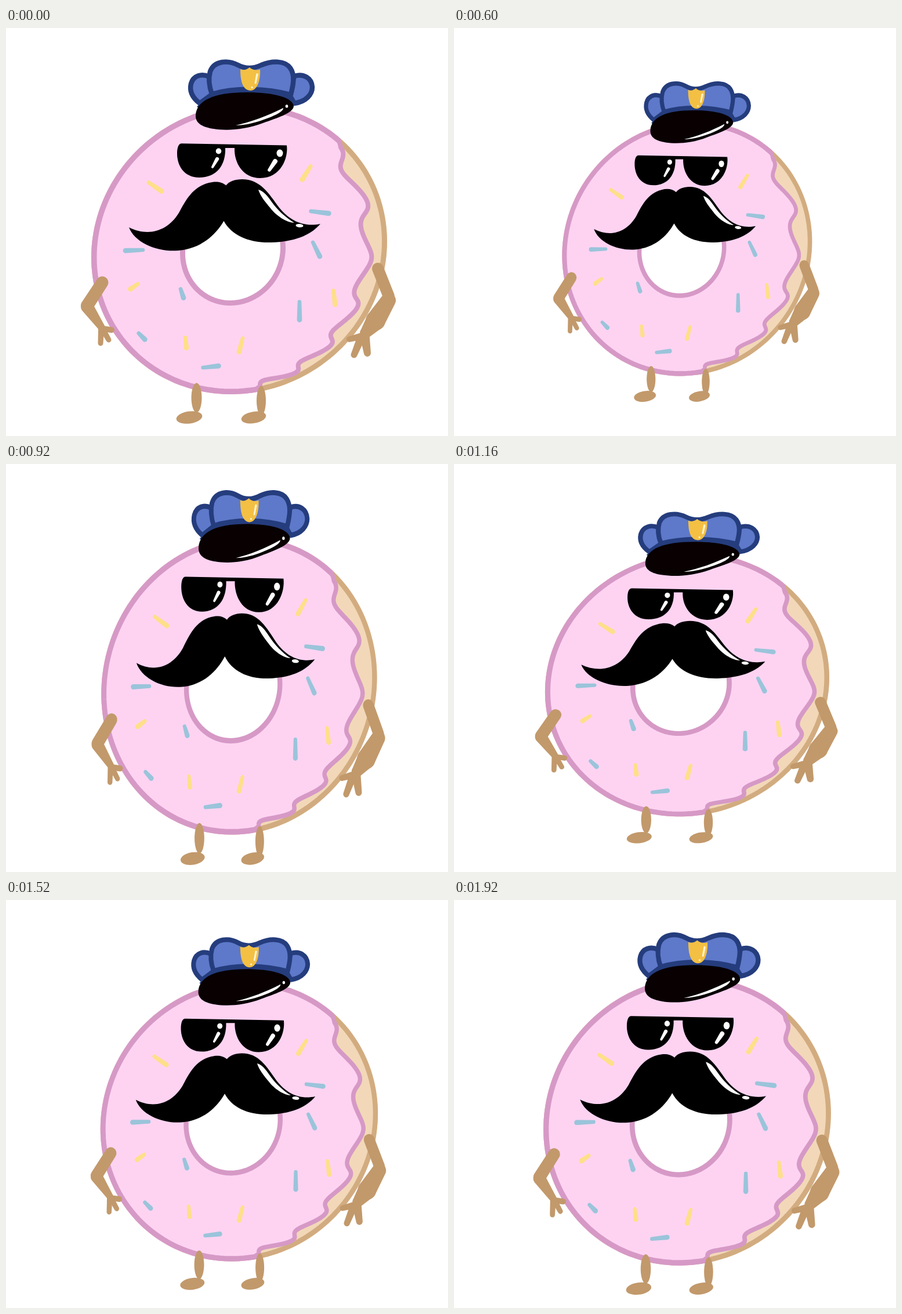
Recreate the animation shown at these times as an HTML page with a canvas. Size 762x704 px, loop 2 s.

```html
<!DOCTYPE html>
<html lang="en">
<head>
<meta charset="utf-8">
<title>Donut officer</title>
<style>
html, body { margin: 0; width: 100%; height: 100%; overflow: hidden; background: #fff; }
canvas { display: block; }
</style>
</head>
<body>
<canvas id="stage" width="762" height="704"></canvas>
<script>
const ctx = document.getElementById('stage').getContext('2d');
const { PI, cos, sin, tanh, atan2, min, floor } = Math;
const LOOP = 2000, STEP = 40, LAST = 1920;
const PIVOT = { x: 401.2, y: 369 };

const C = {
  dough: '#f2d8b8', crust: '#d2ac80', icing: '#fed3f2', rim: '#d699c6',
  limb: '#c2996b', blue: '#5e79c9', navy: '#253d7d', gold: '#f3c044',
  visor: '#080001', yellow: '#fedf89', sky: '#9ac4da', glint: '#fff3d0'
};

// Key poses of the wobble: time, width, height
const POSES = [
  [0, 1, 1], [280, .85, .968], [430, .98, .998], [600, .845, .88],
  [800, 1, .98], [920, .932, 1.029], [1160, .961, .91], [1420, .9, 1],
  [1520, .938, .968], [1720, .89, .93], [1920, .972, .995], [LOOP, 1, 1]
];

function poseAt(t) {
  const i = POSES.findIndex(p => p[0] > t);
  const a = POSES[i - 1], b = POSES[i];
  const ease = (1 - cos(PI * (t - a[0]) / (b[0] - a[0]))) / 2;
  return [1, 2].map(k => a[k] + (b[k] - a[k]) * ease);
}

function fill(shape, color) {
  ctx.fillStyle = color;
  ctx.fill(shape);
}

function line(shape, color, width) {
  ctx.strokeStyle = color;
  ctx.lineWidth = width;
  ctx.stroke(shape);
}

function oval(x, y, rx, ry, turn = 0) {
  const p = new Path2D();
  p.ellipse(x, y, rx, ry, turn, 0, PI * 2);
  return p;
}

// Rounded bar whose ends may differ in radius
function bar(x1, y1, x2, y2, r1, r2) {
  const a = atan2(y2 - y1, x2 - x1), q = PI / 2;
  const p = new Path2D();
  p.arc(x1, y1, r1, a + q, a - q);
  p.arc(x2, y2, r2, a - q, a + q);
  p.closePath();
  return p;
}

// Slightly slanted ellipse
function ring(x, y, rx, ry) {
  const p = new Path2D();
  for (let a = 0; a < 2 * PI; a += PI / 90) p.lineTo(x + rx * cos(a), y + ry * sin(a - .055));
  p.closePath();
  return p;
}

// Icing edge: a ripple around the center whose bumps get closer and flatter
function ripple() {
  const p = new Path2D();
  p.moveTo(548, 160);
  for (let n = 0; n <= 6; n += .04) {
    const dip = (1 - cos(2 * PI * n)) / 2;
    const deg = -45 + 26 * n - .78 * n * n + 5 * tanh(1.6 * (n - 1.9)) * dip;
    const r = 219 + 18 * ((deg - 19) / 64) ** 2 + (11 - 1.1 * n) * (1 - 2 * dip);
    const x = 402 + r * cos(deg * PI / 180), y = 382 + r * sin(deg * PI / 180);
    if (n) p.lineTo(x, y);
    else p.quadraticCurveTo(572, 180, x, y);
  }
  p.lineTo(420, 640);
  return p;
}

function iced(edge) {
  const p = new Path2D(edge);
  for (const [x, y] of [[100, 660], [100, 60], [548, 60]]) p.lineTo(x, y);
  p.closePath();
  return p;
}

const body = ring(402, 382, 255, 250);
const hole = ring(391, 384, 82, 86);
const edge = ripple();
const icing = iced(edge);

// Center, angle in degrees, length
function sprinkle(x, y, deg, size = 27) {
  const dx = cos(deg * PI / 180) * size / 2, dy = sin(deg * PI / 180) * size / 2;
  return bar(x - dx, y - dy, x + dx, y + dy, 3.3, 4.4);
}
const sprinkles = {
  yellow: [[257, 274, 34], [518, 250, 122], [221, 446, 145, 16],
    [566, 465, 83, 24], [310, 543, 84, 18], [405, 547, 105, 24]],
  sky: [[541, 318, 7, 31], [221, 383.5, 178, 30], [303.5, 458, 72, 16],
    [535, 382, 64], [506, 488, 90, 31], [234, 532, 45, 15], [353, 584.5, -6]]
};

const limbs = [
  bar(166, 439, 140, 479, 10.5, 11), bar(140, 481, 165, 517, 11, 6),
  bar(168, 519, 182, 521, 5, 5), bar(168, 522, 177, 538, 5, 4.5), bar(164, 520, 163, 544, 5, 4.5),
  bar(641, 415, 660, 463, 10, 10), bar(659, 470, 637, 505, 13, 17), bar(637, 505, 620, 526, 17, 10),
  bar(612, 532, 592, 537, 6, 5), bar(612, 535, 600, 564, 7, 5.5), bar(619, 535, 623, 561, 8, 6),
  oval(328.5, 638, 9, 25.5), oval(440, 643, 8, 25.5),
  oval(316, 672, 22.5, 10.5, -.13), oval(427, 672, 21.5, 10, -.17)
];

const mustache = new Path2D(
  'M212,344C222,371 262,387 297,384C335,381 361,358 375.5,333' +
  'C389,358 419,371 457,370C495,369 524,359 542,338' +
  'C512,344 489,332 471,310C452,284 438,261 407,261C395,261 384,265 379.5,271.5' +
  'C372,265 361,264 350,267C321,274 309,299 298,319C279,350 246,361 212,344Z');
const shine = new Path2D('M435,279C444,281 451,290 458,300C468,314 482,327 497,336C484,336 466,324 456,311C447,300 439,291 435,279Z');
const glasses = new Path2D(
  'M303,199.3L484,202.5C487,224 474,259 438,259C409,259 393,233 394,207L378,207' +
  'C379,237 363,258 333,258C307,258 294,237 295,214C295.5,207 297,199.3 303,199.3Z');

const hat = {
  left: new Path2D('M334,130C321,120 316,108 319,96C323,82 337,78 350,84L356,114Z'),
  right: new Path2D('M497,130C518,127 528,114 528,102C527,86 513,78 497,83L488,114Z'),
  top: new Path2D('M355,114C350,101 349,86 352,75C359,56 383,55 400,64C413,71 427,70 440,64' +
    'C459,56 481,56 490,69C499,82 495,99 491,115C450,104 397,102 355,114Z'),
  band: new Path2D('M329,136C345,115 374,105 416,104C458,104 484,111 503,128L493,136L336,140Z'),
  visor: new Path2D('M327,150C329,125 358,111 415,111C462,111 495,120 496,135' +
    'C495,147 468,155 443,164C409,177 377,177 358,174C338,171 326,164 327,150Z'),
  gleam: new Path2D('M396,168C423,162 450,152 478,138C479,145 457,154 439,160C424,165 408,168 396,168Z'),
  badge: new Path2D('M404,71C410,74 416,71 420,68C424,72 431,74 438,71.5C439,89 434,108 421,108C407,107 404,89 404,71Z')
};

function drawDonut() {
  ctx.save();
  ctx.clip(body);
  fill(body, C.dough);
  line(body, C.crust, 18);
  ctx.save();
  ctx.clip(icing);
  fill(icing, C.icing);
  line(body, C.rim, 19);
  ctx.restore();
  line(edge, C.rim, 8);
  ctx.restore();

  line(hole, C.rim, 18);
  fill(hole, '#fff');
  for (const color in sprinkles) {
    for (const s of sprinkles[color]) fill(sprinkle(...s), C[color]);
  }
}

function drawFace() {
  fill(mustache, '#000');
  fill(glasses, '#000');
  const lights = [
    shine, oval(506, 341, 6.5, 3, .1),
    oval(366.5, 212.5, 4.8, 5), bar(364, 226, 356, 240, 3.2, 2),
    oval(472, 216, 5.5, 6.5), bar(464, 230, 454, 245, 4, 2.8)
  ];
  for (const light of lights) fill(light, '#fff');
}

function drawHat() {
  for (const part of [hat.left, hat.right, hat.top]) {
    fill(part, C.blue);
    line(part, C.navy, 8.5);
  }
  fill(hat.band, C.navy);
  fill(hat.visor, C.visor);
  fill(hat.gleam, '#fff');
  fill(oval(484, 135, 2.3, 2.8), '#fff');
  fill(hat.badge, C.gold);
  fill(bar(433, 80, 430, 95, 1.8, 1.5), C.glint);
  fill(oval(424, 102.5, 1.6, 1.8), C.glint);
}

function draw(t) {
  ctx.setTransform(1, 0, 0, 1, 0, 0);
  ctx.fillStyle = '#fff';
  ctx.fillRect(0, 0, 762, 704);
  ctx.translate(PIVOT.x, PIVOT.y);
  ctx.scale(...poseAt(t));
  ctx.translate(-PIVOT.x, -PIVOT.y);
  ctx.lineJoin = 'round';
  drawDonut();
  for (const limb of limbs) fill(limb, C.limb);
  drawFace();
  drawHat();
}

const start = performance.now();
function tick() {
  const t = (performance.now() - start) % LOOP;
  draw(min(LAST, floor(t / STEP) * STEP));
  requestAnimationFrame(tick);
}
tick();
</script>
</body>
</html>
```
